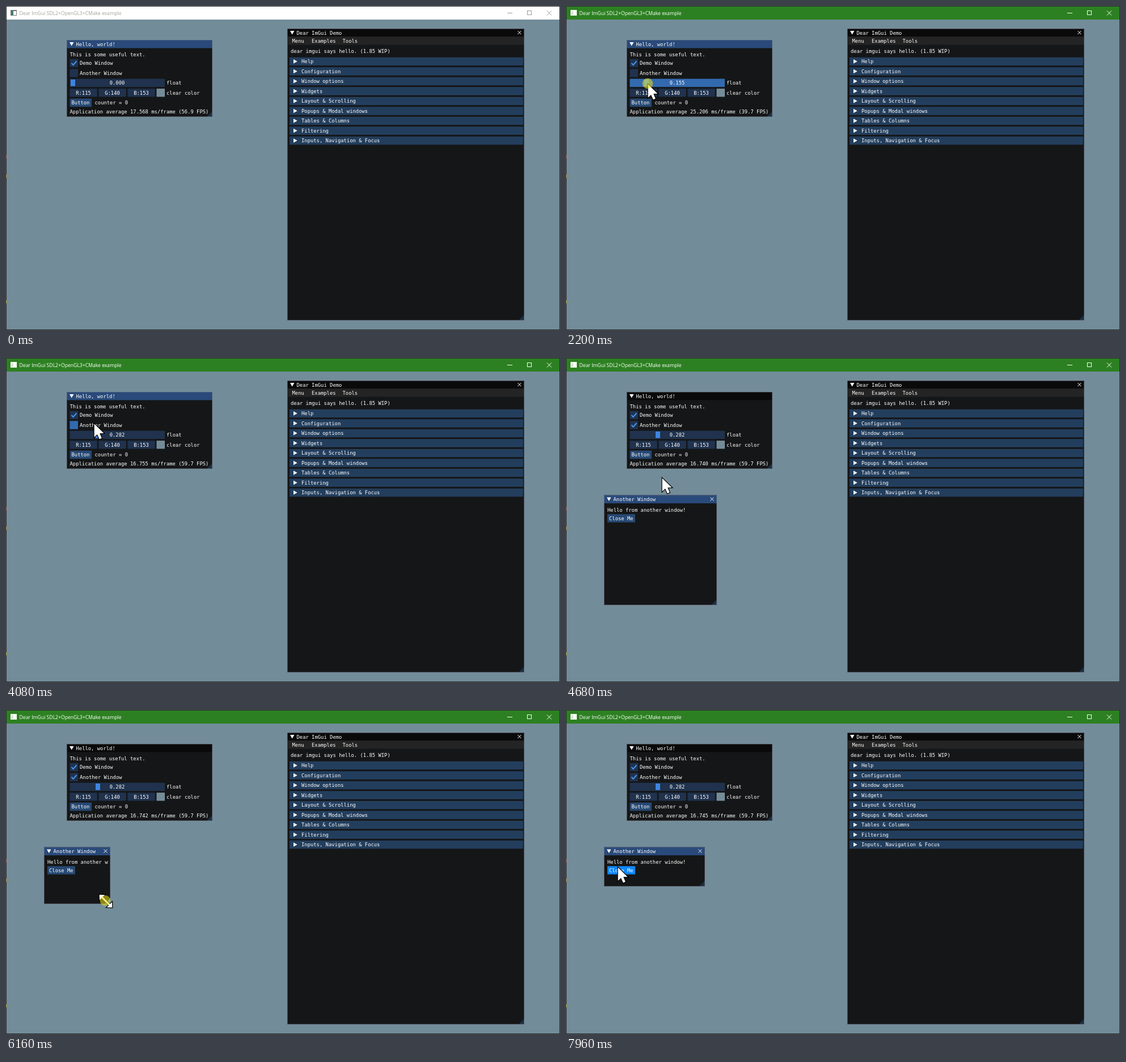
Animation of 977x573 px, one loop 8000 ms. Source, as an HTML page with a canvas:

```html
<!DOCTYPE html>
<html lang="en">
<head>
<meta charset="utf-8">
<title>Immediate mode GUI demo</title>
<style>
  html, body { margin: 0; width: 100%; height: 100%; overflow: hidden; background: #738c99; }
  canvas { display: block; width: 977px; height: 573px; }
</style>
</head>
<body>
<canvas id="stage" width="977" height="573"></canvas>
<script>
const ctx = document.getElementById('stage').getContext('2d');
const LOOP = 8000, STEP = 40;
const MONO = '8.85px "DejaVu Sans Mono", monospace';
const SANS = '8.65px "Open Sans", sans-serif';
const C = {
  clear: '#738c99', panel: '#151617', border: 'rgba(110,110,128,.5)',
  title: '#0a0a0a', titleActive: '#294a7a', menu: '#242424', header: '#233e5d',
  frame: '#20324d', hover: '#274972', active: '#336aaf',
  button: '#274972', accent: '#4296fa', pressed: '#0f87fa',
  grab: '#3d85e0', grip: '#1e3044'
};

// time, x, y
const pointerKeys = [
  [40, 597, 513], [840, 236, 164], [1000, 232, 151], [1640, 120, 137], [1800, 120, 137],
  [2200, 144, 137], [2600, 166, 137], [2980, 176, 137], [3360, 163.8, 137], [3480, 163.8, 137],
  [3840, 155, 115], [4240, 155, 115], [5080, 198, 356], [5360, 257, 444], [5640, 257, 431],
  [5980, 257, 431], [6160, 175, 337], [6500, 281, 375], [6800, 246, 316], [6960, 236, 306],
  [7120, 236, 306], [7640, 91, 277], [8000, 91, 277]
];
// time, milliseconds per frame
const frameTimeKeys = [
  [0, 17.568], [1000, 21.252], [2200, 25.206], [4080, 16.755],
  [5360, 16.734], [6160, 16.742], [7960, 16.745]
];
const SLIDE = [1800, 3440], CHECK = [4040, 4200], RESIZE = [5980, 7060];
const within = (t, [a, b]) => t >= a && t < b;
const clamp = (v, a, b) => Math.min(b, Math.max(a, v));

// Monotone cubic through column k of a key table
function track(keys, t, k) {
  const last = keys.length - 1;
  t = clamp(t, keys[0][0], keys[last][0]);
  let i = 0;
  while (i < last - 1 && t >= keys[i + 1][0]) i++;
  const secant = n => n < 0 || n >= last ? 0 :
    (keys[n + 1][k] - keys[n][k]) / (keys[n + 1][0] - keys[n][0]);
  const slope = n => {
    const a = secant(n - 1), b = secant(n);
    return a * b <= 0 ? 0 : 2 * a * b / (a + b);
  };
  const h = keys[i + 1][0] - keys[i][0], u = (t - keys[i][0]) / h, w = 1 - u;
  return keys[i][k] * (1 + 2 * u) * w * w + keys[i + 1][k] * u * u * (3 - 2 * u) +
    h * u * w * (slope(i) * w - slope(i + 1) * u);
}

function rect(x, y, w, h, color) {
  ctx.fillStyle = color;
  ctx.fillRect(x, y, w, h);
}
function text(s, x, middle, align = 'left') {
  ctx.font = MONO;
  ctx.fillStyle = '#fff';
  ctx.textAlign = align;
  ctx.fillText(s, x, middle + 3);
}
function path(points, closed) {
  ctx.beginPath();
  points.forEach(([x, y]) => ctx.lineTo(x, y));
  if (closed) ctx.closePath();
}
function shape(points, color) {
  path(points, true);
  ctx.fillStyle = color;
  ctx.fill();
}
function line(points, color, width) {
  path(points);
  ctx.strokeStyle = color;
  ctx.lineWidth = width;
  ctx.stroke();
}
function cross(x, y, r, color) {
  line([[x - r, y - r], [x + r, y + r]], color, 1);
  line([[x - r, y + r], [x + r, y - r]], color, 1);
}

function systemWindow(focused) {
  rect(0, 0, 977, 573, '#2b2e2c');
  rect(1, 24, 975, 548, C.clear);
  rect(1, 1, 975, 23, focused ? '#2d8022' : '#fff');
  [[267, '#8a4a45'], [301, '#b07a18'], [523, '#9a9a18']].forEach(([y, c]) => rect(0, y - 3, 1, 6, c));

  const ink = focused ? '#fff' : '#999';
  rect(8, 7, 11, 10, focused ? '#fff' : '#777');
  rect(9, 9, 9, 7, '#fff');
  rect(9, 9, 4, 7, focused ? '#d5ead2' : '#3f7f78');
  ctx.font = SANS;
  ctx.textAlign = 'left';
  ctx.fillStyle = focused ? '#fff' : '#a3a39b';
  ctx.fillText('Dear ImGui SDL2+OpenGL3+CMake example', 23.5, 16);
  line([[884, 12.5], [893, 12.5]], ink, 1);
  ctx.strokeRect(919.5, 8.5, 7, 7);
  cross(958, 12.5, 4, ink);
}

function panel(x, y, right, bottom, title, color, closable, gripColor = C.grip) {
  rect(x, y, right - x, bottom - y, C.panel);
  rect(x, y, right - x, 14.5, color);
  shape([[right, bottom - 10], [right, bottom], [right - 10, bottom]], gripColor);
  ctx.strokeStyle = C.border;
  ctx.lineWidth = 1;
  ctx.strokeRect(x + .5, y + .5, right - x - 1, bottom - y - 1);
  const m = y + 7.5;
  shape([[x + 5, m - 3.5], [x + 12.5, m - 3.5], [x + 8.7, m + 3]], '#fff');
  text(title, x + 16.5, m);
  if (closable) cross(right - 8.5, m - .5, 3, '#fff');
}

function demoPanel() {
  panel(496, 40, 914, 556, 'Dear ImGui Demo', C.title, true);
  rect(497, 54, 416, 14.5, C.menu);
  [['Menu', 504.5], ['Examples', 539], ['Tools', 593.5]].forEach(([s, x]) => text(s, x, 62));
  text('dear imgui says hello. (1.85 WIP)', 502, 80);
  ['Help', 'Configuration', 'Window options', 'Widgets', 'Layout & Scrolling',
   'Popups & Modal windows', 'Tables & Columns', 'Filtering', 'Inputs, Navigation & Focus'
  ].forEach((s, i) => {
    const m = 98 + i * 17.5;
    rect(500, m - 7.2, 412, 14.5, C.header);
    shape([[507, m - 3.7], [513.7, m], [507, m + 3.7]], '#fff');
    text(s, 521, m);
  });
}

function checkbox(label, m, checked, color) {
  rect(112.5, m - 7.2, 14.5, 14.5, color);
  if (checked) line([[115.5, m], [118.5, m + 3.3], [124.5, m - 3.5]], C.accent, 2);
  text(label, 130, m);
}

function helloPanel(t, over) {
  const opened = t >= CHECK[1], sliding = within(t, SLIDE);
  const tint = (...box) => over(...box) && !sliding ? C.hover : C.frame;
  panel(107, 60, 364, 196, 'Hello, world!', opened ? C.title : C.titleActive, false);
  text('This is some useful text.', 112.5, 86);
  checkbox('Demo Window', 101, true, tint(112, 94, 190, 108));
  checkbox('Another Window', 118.5, opened,
    within(t, CHECK) ? C.active : tint(112, 111, 206, 126));

  const x = track(pointerKeys, clamp(t, SLIDE[0], 3400), 1);
  const value = t < SLIDE[0] ? 0 : clamp((x - 119.8) / 156, 0, 1);
  rect(112.5, 128.7, 167.5, 14.5, sliding ? C.active : tint(112, 128, 280, 143));
  rect(114 + value * 156, 130, 8, 11.7, sliding ? C.accent : C.grab);
  text(value.toFixed(3), 196, 136, 'center');
  text('float', 283, 136);

  ['R:115', 'G:140', 'B:153'].forEach((s, i) => {
    const left = 112.5 + i * 51;
    rect(left, 146.2, 48.3, 14.3, tint(left, 146, left + 48, 160));
    text(s, left + 24, 153.5, 'center');
  });
  rect(265.5, 146.2, 14.5, 14.3, '#7f949f');
  rect(266.5, 147.2, 12.5, 12.3, C.clear);
  text('clear color', 283, 153.5);

  rect(112.5, 163.7, 38.5, 14.5, !sliding && over(112, 163, 151, 178) ? C.accent : C.button);
  text('Button', 115.5, 171);
  text('counter = 0', 156.5, 171);
  const ms = track(frameTimeKeys, t, 1);
  text(`Application average ${ms.toFixed(3)} ms/frame (${(1000 / ms).toFixed(1)} FPS)`, 112.5, 186.5);
}

function anotherPanel(t, over) {
  const held = clamp(t, ...RESIZE);
  const right = Math.round(track(pointerKeys, held, 1) + 9);
  const bottom = Math.round(track(pointerKeys, held, 2) + 6);
  const grip = within(t, RESIZE) ? C.accent : within(t, [5600, 7100]) ? C.active : C.grip;
  panel(67, 242.5, right, bottom, 'Another Window', C.titleActive, true, grip);
  ctx.save();
  ctx.beginPath();
  ctx.rect(67, 243, right - 70.5, bottom - 243);
  ctx.clip();
  text('Hello from another window!', 73, 268.5);
  const hot = over(73, 276, 122, 290) && !within(t, RESIZE);
  rect(73, 276.2, 49, 14.5, t >= 7920 ? C.pressed : hot ? C.accent : C.button);
  text('Close Me', 76, 283.5);
  ctx.restore();
}

function outlined(points) {
  path(points, true);
  ctx.lineJoin = 'miter';
  ctx.lineWidth = 2.4;
  ctx.strokeStyle = '#000';
  ctx.stroke();
  ctx.fillStyle = '#fff';
  ctx.fill();
}

function pointer(t, x, y) {
  ctx.save();
  ctx.translate(x, y);
  if (within(t, [5600, 7100])) {
    ctx.translate(1, 1);
    ctx.rotate(Math.PI / 4);
    const half = [[-16, 0], [-9, -6.5], [-9, -1.6], [9, -1.6], [9, -6.5]];
    outlined([...half, ...half.map(([a, b]) => [-a, -b])]);
  } else {
    outlined([[.7, 1.5], [.7, 25], [6, 20], [9.8, 28.5], [13.8, 26.8], [10.2, 18.3], [17.5, 18]]);
  }
  ctx.restore();
  if ([[1840, 3440], [4110, 4230], [6000, 7060]].some(span => within(t, span))) {
    ctx.beginPath();
    ctx.arc(x, y, 9.3, 0, Math.PI * 2);
    ctx.fillStyle = 'rgba(236,222,20,.56)';
    ctx.fill();
  }
}

function draw(t) {
  const x = track(pointerKeys, t, 1), y = track(pointerKeys, t, 2);
  const over = (l, top, r, b) => t >= STEP && x >= l && x < r && y >= top && y < b;
  systemWindow(t >= SLIDE[0]);
  demoPanel();
  helloPanel(t, over);
  if (t >= CHECK[1]) anotherPanel(t, over);
  if (t >= STEP) pointer(t, Math.round(x), Math.round(y));
}

const start = performance.now();
function tick() {
  const t = (performance.now() - start) % LOOP;
  draw(Math.floor(t / STEP) * STEP);
  requestAnimationFrame(tick);
}
tick();
</script>
</body>
</html>
```
